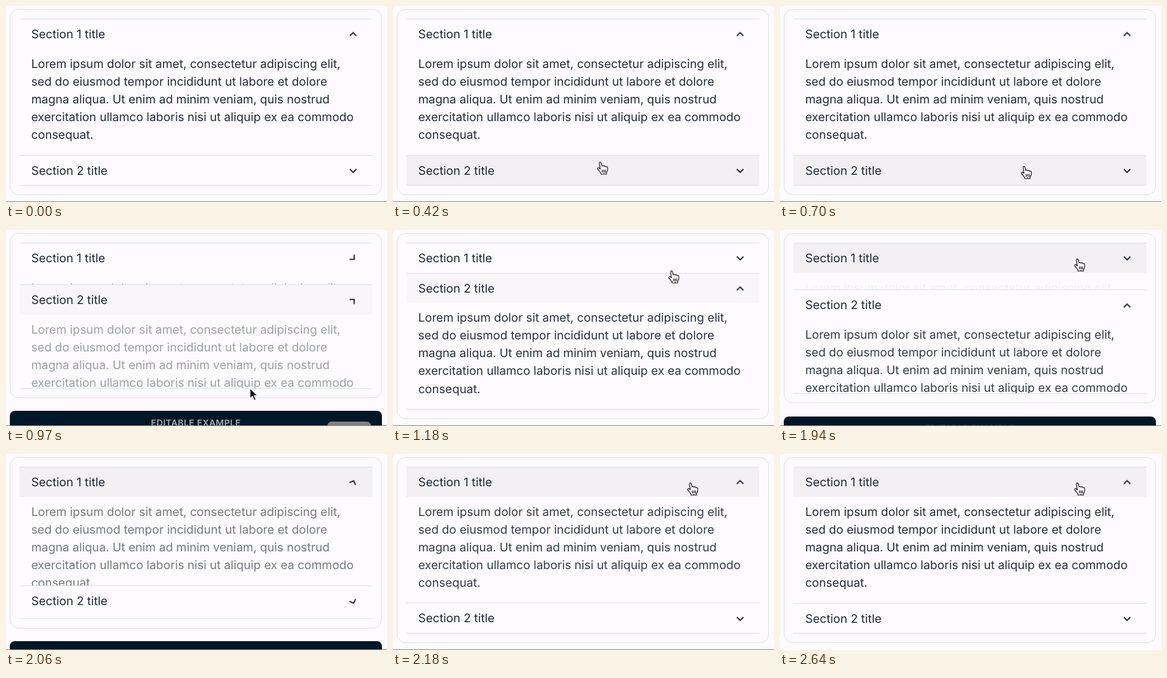
Write an HTML page that moves like this. It is 600x310 px and loops after 2.67 s.

```html
<!DOCTYPE html>
<html lang="en">
<head>
<meta charset="utf-8">
<title>Accordion</title>
<style>
:root { --page: #fdfbfe; --line: #dce1ea; --ink: #1f2733; --hover: rgba(0, 0, 0, .042); --half: rgba(0, 0, 0, .02); }
* { box-sizing: border-box; }
html, body { margin: 0; width: 100%; height: 100%; overflow: hidden; }
body {
  position: relative;
  background: var(--page);
  color: var(--ink);
  font: 18.667px/28px Inter, "Liberation Sans", sans-serif;
  font-optical-sizing: none;
  text-rendering: geometricPrecision;
  -webkit-font-smoothing: antialiased;
}
.stage { position: absolute; left: 0; top: 0; width: 600px; height: 310px; overflow: hidden; }
.card {
  position: relative;
  width: 586px;
  margin: 5px 0 0 6px;
  padding: 14px;
  border: 1px solid var(--line);
  border-radius: 14px;
}
.item { border-top: 1px solid var(--line); }
.item:last-child { border-bottom: 1px solid var(--line); }
.head {
  display: flex;
  align-items: center;
  justify-content: space-between;
  height: 46.667px;
  padding: 1.4px 18.667px 0;
}
.icon { width: 23.333px; height: 23.333px; fill: var(--ink); }
.panel { overflow: hidden; color: #242c38; }
.text { height: 168px; padding: 10.333px 18.667px 0; white-space: nowrap; }

.code {
  position: relative;
  width: 586px;
  height: 120px;
  margin: 20.5px 0 0 6px;
  padding-top: 9.333px;
  border-radius: 8px;
  background: #011627;
  color: #a0aab6;
  font-size: 14px;
  font-weight: 600;
  line-height: 21px;
  letter-spacing: .02em;
  text-align: center;
}
.button { position: absolute; left: 500px; top: 17px; width: 69px; height: 28px; border-radius: 7px; background: #808184; }
.edge { position: absolute; left: 0; top: 309px; width: 600px; height: 1px; background: #8a8a8c; }
.cursor { position: absolute; left: 0; top: 0; width: 1px; height: 1px; overflow: visible; }

/* One shared 2670 ms timeline */
.panel, .icon, .head, .edge, .cursor, .hand, .arrow { animation: 2670ms ease infinite; }
.first .panel { animation-name: panel-first; }
.second .panel { animation-name: panel-second; }
.first .icon { animation-name: icon-first; }
.second .icon { animation-name: icon-second; }
.first .head { animation-name: head-first; }
.second .head { animation-name: head-second; }
.edge { animation-name: edge; animation-timing-function: step-end; }
.cursor { animation-name: move, show; animation-timing-function: linear, step-end; }
.hand { animation-name: hand; animation-timing-function: step-end; }
.arrow { animation-name: arrow; animation-timing-function: step-end; }

@keyframes panel-first {
  0%, 31.84% { height: 168px; }
  0%, 32.4% { opacity: 1; }
  39.33%, 71.16% { height: 0; }
  43.63%, 71.72% { opacity: 0; }
  82.4%, 100% { height: 168px; }
  86.7%, 100% { opacity: 1; }
}
@keyframes panel-second {
  0%, 31.84% { height: 0; }
  0%, 32.4% { opacity: 0; }
  43.07%, 71.16% { height: 168px; }
  47.38%, 71.72% { opacity: 1; }
  78.65%, 100% { height: 0; }
  82.96%, 100% { opacity: 0; }
}
@keyframes icon-first {
  0%, 33.03% { transform: rotate(-180deg); }
  40.52%, 72.73% { transform: rotate(0deg); }
  80.22%, 100% { transform: rotate(-180deg); }
}
@keyframes icon-second {
  0%, 33.03% { transform: rotate(0deg); }
  40.52%, 72.73% { transform: rotate(-180deg); }
  80.22%, 100% { transform: rotate(0deg); }
}
@keyframes head-first {
  0%, 44.1% { background-color: transparent; }
  51.5%, 100% { background-color: var(--hover); }
}
@keyframes head-second {
  0%, 10.08% { background-color: transparent; }
  17.57%, 34.08% { background-color: var(--hover); }
  41.57% { background-color: transparent; }
  43.63% { background-color: var(--half); }
  50.19%, 100% { background-color: transparent; }
}
@keyframes move {
  0%, 8.95% { transform: translate(325px, 261px); animation-timing-function: step-end; }
  10.08%, 14.6% { transform: translate(325px, 246px); animation-timing-function: ease-in-out; }
  26.2%, 33.7% { transform: translate(384px, 253px); }
  36.33% { transform: translate(384px, 250px); animation-timing-function: cubic-bezier(.45, .1, .7, .85); }
  44.19% { transform: translate(438px, 64px); animation-timing-function: ease-out; }
  50.94%, 52.1% { transform: translate(464px, 47px); animation-timing-function: ease-out; }
  58.05%, 100% { transform: translate(468px, 45px); }
}
@keyframes show {
  0% { opacity: 0; }
  8.95% { opacity: 1; }
  76% { opacity: 0; }
  78.25%, 100% { opacity: 1; }
}
@keyframes hand {
  0% { opacity: 0; }
  10.08% { opacity: 1; }
  34.05% { opacity: 0; }
  41.9%, 100% { opacity: 1; }
}
@keyframes arrow {
  0% { opacity: 1; }
  10.08% { opacity: 0; }
  34.05% { opacity: 1; }
  41.9%, 100% { opacity: 0; }
}
@keyframes edge {
  0% { opacity: 1; }
  98.85%, 100% { opacity: 0; }
}
</style>
</head>
<body>
<div class="stage">
  <div class="card">
    <div class="item first">
      <div class="head">Section 1 title
        <svg class="icon" viewBox="0 0 24 24"><path d="M16.59 8.59 12 13.17 7.41 8.59 6 10l6 6 6-6z"/></svg>
      </div>
      <div class="panel"><div class="text">Lorem ipsum dolor sit amet, consectetur adipiscing elit,<br>sed do eiusmod tempor incididunt ut labore et dolore<br>magna aliqua. Ut enim ad minim veniam, quis nostrud<br>exercitation ullamco laboris nisi ut aliquip ex ea commodo<br>consequat.</div></div>
    </div>
    <div class="item second">
      <div class="head">Section 2 title
        <svg class="icon" viewBox="0 0 24 24"><path d="M16.59 8.59 12 13.17 7.41 8.59 6 10l6 6 6-6z"/></svg>
      </div>
      <div class="panel"><div class="text">Lorem ipsum dolor sit amet, consectetur adipiscing elit,<br>sed do eiusmod tempor incididunt ut labore et dolore<br>magna aliqua. Ut enim ad minim veniam, quis nostrud<br>exercitation ullamco laboris nisi ut aliquip ex ea commodo<br>consequat.</div></div>
    </div>
  </div>
  <div class="code">EDITABLE EXAMPLE<div class="button"></div></div>
  <div class="edge"></div>
  <svg class="cursor">
    <g class="hand" stroke="#111" stroke-width="1.2" stroke-linejoin="round" stroke-linecap="round">
      <path fill="#fff" transform="translate(-5 0)" d="M5.2 11.6 3.9 3C3.5.3 6.3.2 6.9 2.4L8 7.2C8.3 5.9 10.6 5.9 11 7.6 11.6 6.4 13.5 6.6 13.9 8.4 14.8 7.6 16.8 8 16.8 9.8V13C16.7 15.5 15 16.4 14.8 18V20H12.4L11.3 18.8 10 20H6.4L6.2 18C4.5 16.4 3.4 14 1.5 12.2.2 10.6 2 9 3.6 10.2Z"/>
      <path fill="none" d="M3.6 13v3.8M6 13v3.8M8.4 13v3.8"/>
    </g>
    <g class="arrow">
      <path fill="#111" stroke="#fff" stroke-width="1.4" stroke-linejoin="round" d="M0 0V17L4 13.2 6.8 20 9.8 18.8 7 12.2H12.4Z"/>
    </g>
  </svg>
</div>
</body>
</html>
```
